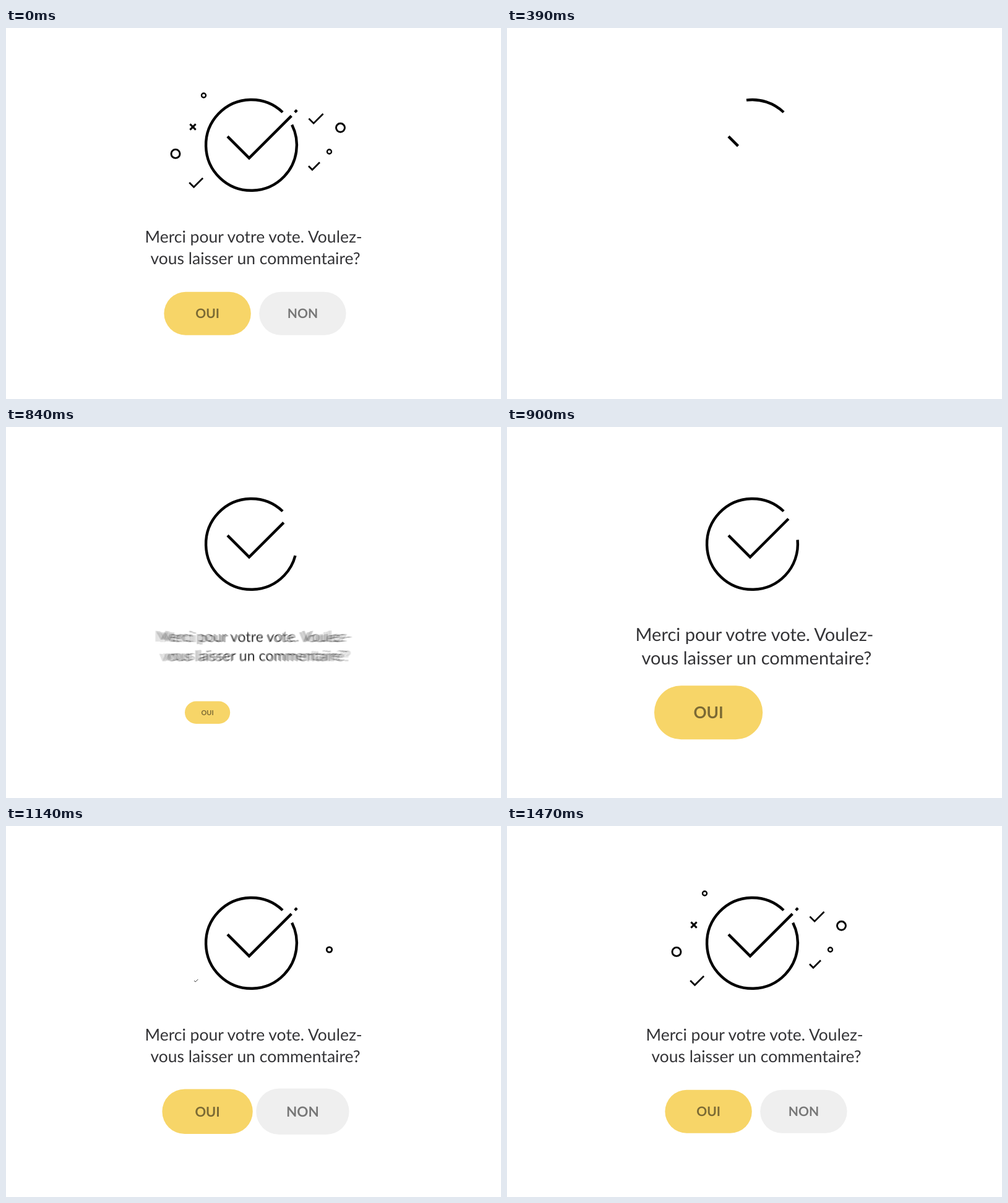
These frames come from a looping animation (800 px wide and 600 px high, 1.8 s). An HTML page with a canvas:

```html
<!DOCTYPE html>
<html lang="fr">
<head>
<meta charset="utf-8">
<title>Merci</title>
<style>
  html, body { margin: 0; width: 100%; height: 100%; overflow: hidden; background: #fff; }
  canvas { display: block; }
</style>
</head>
<body>
<canvas id="stage" width="800" height="600"></canvas>
<script>
const ctx = document.getElementById('stage').getContext('2d');
const LOOP = 1800, STEP = 30, RESTART = 5;

const clamp = x => Math.min(1, Math.max(0, x));
const smooth = x => x * x * (3 - 2 * x);
const easeOut = x => 1 - (1 - x) * (1 - x);

// cubic-bezier(.4, 0, .6, 1), solved by bisection
function drawEase(x) {
  let lo = 0, hi = 1;
  for (let i = 0; i < 24; i++) {
    const s = (lo + hi) / 2, r = 1 - s;
    if (1.2 * s * r * r + 1.8 * s * s * r + s * s * s < x) lo = s; else hi = s;
  }
  return smooth(lo);
}

// Grow from nothing to a peak, then settle at 1.
function pop(age, rise, settle, peak, ease = smooth) {
  return age < rise
    ? peak * ease(clamp(age / rise))
    : peak + (1 - peak) * smooth(clamp((age - rise) / settle));
}

function scaled(x, y, s, draw) {
  if (s <= 0) return;
  ctx.save();
  ctx.translate(x, y);
  ctx.scale(s, s);
  draw();
  ctx.restore();
}

function line(width, ...pts) {
  ctx.lineWidth = width;
  ctx.beginPath();
  for (let i = 0; i < pts.length; i += 2) ctx.lineTo(pts[i], pts[i + 1]);
  ctx.stroke();
}

function arc(x, y, r, width, from, sweep) {
  ctx.lineWidth = width;
  ctx.beginPath();
  ctx.arc(x, y, r, from, from - sweep, true);
  ctx.stroke();
}

const ring = r => () => arc(0, 0, r, 1.8 + 0.16 * r, 0, 2 * Math.PI);
const tick = h => () => line(2.7, -1.5 * h, 0, -0.5 * h, h, 1.5 * h, -h);
const cross = r => () => {
  line(3, -r, -r, r, r);
  line(3, -r, r, r, -r);
};

// Small shapes in order of appearance.
const bits = [
  [ring(3.5), 522.5, 200],
  [tick(7.3), 307.2, 250],
  [ring(3.5), 319.5, 109],
  [ring(7), 540.5, 161.3],
  [cross(4.6), 302, 160],
  [tick(6), 498, 223.3],
  [ring(7), 274, 203.4],
  [tick(7.7), 501, 146.5]
];

function drawBits(f) {
  bits.forEach(([shape, x, y], i) => {
    const start = 35.4 + 1.8 * i ** 0.65;
    scaled(x, y, pop(f - start, 2.5, 4.5, 1.2), shape);
  });
}

function drawMark(f) {
  const p = drawEase(clamp((f - 5.1) / 30));
  if (p > 0.0005) {
    arc(396.5, 189.4, 73.4, 4.4, -0.81, 5.938 * p);
    const total = Math.SQRT2 * 103.3;
    ctx.setLineDash([total * p, total * 2]);
    line(4.4, 358, 175.4, 393, 210.4, 461.3, 142.1);
    ctx.setLineDash([]);
  }
  const d = 3.4 * smooth(clamp((f - 34) / 2));
  if (d > 0) line(4.2, 466.8, 136.2, 466.8 + d, 136.2 - d);
}

// Motion blur: average several moments within half a step.
function drawMessage(f) {
  const age = f - 25.2, rise = 5.1;
  const n = age > 0 && age < rise - 0.3 ? 10 : 1;
  ctx.globalCompositeOperation = 'lighter';
  ctx.globalAlpha = 1 / n;
  ctx.font = '400 26.5px Lato, sans-serif';
  ctx.fillStyle = '#333336';
  for (let i = 0; i < n; i++) {
    const shift = ((i + 0.5) / n - 0.5) / 2;
    scaled(400, 354.5, pop(age + shift, rise, 6.2, 1.1, easeOut), () => {
      ctx.fillText('Merci pour votre vote. Voulez-', 0, -8);
      ctx.fillText(' vous laisser un commentaire?', 0, 27);
    });
  }
  ctx.globalAlpha = 1;
  ctx.globalCompositeOperation = 'source-over';
}

function drawButton(x, label, fill, s) {
  scaled(x, 461.75, s, () => {
    ctx.fillStyle = fill;
    ctx.beginPath();
    ctx.roundRect(-70.2, -34.9, 140.4, 69.8, 34.9);
    ctx.fill();
    ctx.fillStyle = 'rgba(0, 0, 0, 0.5)';
    ctx.font = '700 21px Lato, sans-serif';
    ctx.fillText(label, 0, 7.7);
  });
}

function render(f) {
  ctx.clearRect(0, 0, 800, 600);
  ctx.strokeStyle = '#000';
  ctx.textAlign = 'center';
  ctx.textRendering = 'geometricPrecision';
  ctx.fontKerning = 'normal';
  drawMessage(f);
  drawMark(f);
  drawBits(f);
  drawButton(325.6, 'OUI', '#f7d568', pop(f - 26.8, 2.7, 11.5, 1.25));
  drawButton(479.4, 'NON', '#efefef', pop(f - 31.3, 3.7, 14, 1.08));
}

// The finished picture holds until the restart, then cuts to blank.
function loop() {
  const f = Math.floor(performance.now() % LOOP / STEP);
  render(f < RESTART ? LOOP / STEP : f);
  requestAnimationFrame(loop);
}
loop();
</script>
</body>
</html>
```
